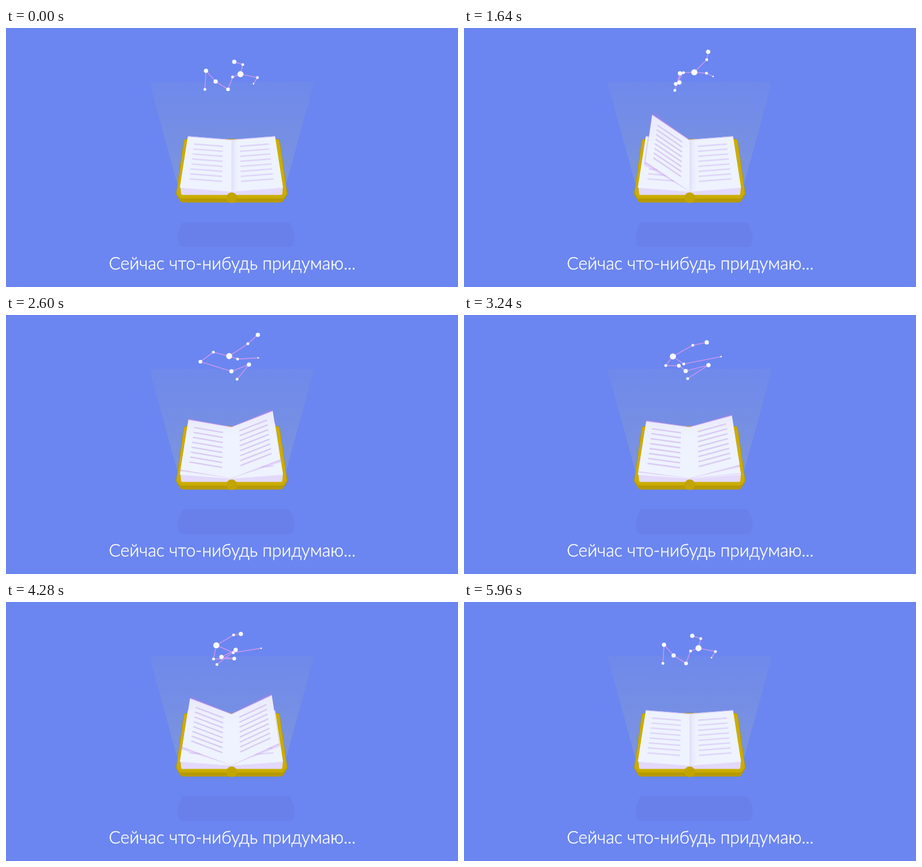
Recreate the animation shown at these times as an HTML page with a canvas. Size 800x460 px, loop 6 s.

```html
<!DOCTYPE html>
<html lang="ru">
<head>
<meta charset="utf-8">
<title>Книга</title>
<style>
html, body { margin: 0; width: 100%; height: 100%; overflow: hidden; background: #6b86f0; }
canvas { display: block; }
</style>
</head>
<body>
<canvas id="stage" width="800" height="460"></canvas>
<script>
const ctx = document.getElementById('stage').getContext('2d');
const LOOP = 6000, STEP = 40;
const MID = 399;
const BODY = 6;       // stars in the body; the rest form two arms
const PAPER = '#eef3ff';

// Three poses of the constellation; it drifts home -> drift -> far -> home.
const HOME = [[352, 109], [354, 76], [371, 95], [393, 109], [401, 87], [415, 82],
              [445, 88], [438, 99], [419, 65], [404, 60]];
const DRIFT = [[409, 114], [430, 88], [399, 100], [344, 83], [367, 66], [395, 73],
               [418, 75], [443, 77], [437, 50], [452, 30]];
const FAR = [[385, 112], [435, 90], [387, 99], [410, 96], [349, 109], [349, 74],
             [379, 91], [459, 73], [394, 55], [422, 55]];
const RADII = [2.5, 3.8, 3.8, 3.3, 2.5, 5.4, 2.5, 1.4, 2.5, 3.8];
const LINKS = [[0, 1, 2, 3, 4, 5, 6, 7], [5, 8, 9]];
const BODY_AT = 2600, ARMS_AT = 2100, FAR_AT = 3800, HOME_AT = 5000;

// Page turns, right to left.
const TURN = 900;
const STARTS = [983, 1800, 2420, 3098, 3188, 3368, 3557, 4080];

const mix = (a, b, k) => a + (b - a) * k;
const mixPoint = (p, q, k) => [mix(p[0], q[0], k), mix(p[1], q[1], k)];
const part = (t, from, to) => Math.min(1, Math.max(0, (t - from) / (to - from)));
const smooth = u => u * u * (3 - 2 * u);

function poly(points, fill) {
  ctx.beginPath();
  points.forEach(p => ctx.lineTo(p[0], p[1]));
  ctx.closePath();
  ctx.fillStyle = fill;
  ctx.fill();
}

function softPoly(points, fill, round) {
  ctx.lineJoin = 'round';
  ctx.lineWidth = round * 2;
  ctx.strokeStyle = fill;
  poly(points, fill);
  ctx.stroke();
}

// Mirror a half outline, listed top to bottom, around the spine.
const mirrored = half =>
  half.concat(half.map(([x, y]) => [2 * MID + 1 - x, y]).reverse());

function disc(x, y, r, fill) {
  ctx.beginPath();
  ctx.arc(x, y, r, 0, 7);
  ctx.fillStyle = fill;
  ctx.fill();
}

function gradient(x0, y0, x1, y1, from, to) {
  const g = ctx.createLinearGradient(x0, y0, x1, y1);
  g.addColorStop(0, from);
  g.addColorStop(1, to);
  return g;
}

// Spine top, outer top, outer bottom, spine bottom of a page at angle a.
function pageQuad(a) {
  const c = Math.cos(a), s = Math.sin(a);
  return [[MID, 199], [MID + 76.5 * c, 193 - 77 * s],
          [MID + 90.5 * c, 283 - 90 * s], [MID, 290]];
}

function textLines(q, color) {
  ctx.strokeStyle = color;
  ctx.lineWidth = 2.6;
  ctx.beginPath();
  for (let i = 0; i < 8; i++) {
    const v = 0.135 + i * 0.098;
    const inner = mixPoint(q[0], q[3], v), outer = mixPoint(q[1], q[2], v);
    ctx.moveTo(...mixPoint(inner, outer, 0.19));
    ctx.lineTo(...mixPoint(inner, outer, 0.845));
  }
  ctx.stroke();
}

function topEdge(q, color) {
  ctx.beginPath();
  ctx.moveTo(...q[0]);
  ctx.lineTo(...q[1]);
  ctx.strokeStyle = color;
  ctx.lineWidth = 1.2;
  ctx.stroke();
}

function background() {
  ctx.fillStyle = '#6b86f0';
  ctx.fillRect(0, 0, 800, 460);
  poly(mirrored([[254, 96], [304, 280]]),
    gradient(0, 96, 0, 275, 'rgba(185,200,150,.05)', 'rgba(190,205,150,.2)'));
  softPoly([[317, 352], [498, 352], [504, 368], [502, 382], [313, 382], [311, 368]], '#697fe9', 7);
}

function book() {
  softPoly(mirrored([[320, 203], [307, 294], [313, 304]]), '#b69a02', 6);
  softPoly(mirrored([[320, 203], [307, 293], [311, 298]]), '#cbad00', 4.8);
  softPoly(mirrored([[311, 284], [312, 294.5]]), '#e3d9fb', 2);
  disc(MID + 0.5, 301.5, 9.5, '#c2a500');
  for (const a of [Math.PI, 0]) {
    const q = pageQuad(a);
    softPoly(q, PAPER, 0.8);
    topEdge(q, '#dcc4f8');
    textLines(q, '#dfd5fa');
  }
  poly([[MID, 199], [412, 198], [414, 289], [MID, 290]],
    gradient(MID, 0, 414, 0, '#e2dbfa', 'rgba(238,243,255,0)'));
}

function turningPage(p) {
  const angle = Math.PI / 2 * (1 - Math.cos(Math.PI * p));
  const blur = 0.05 * Math.sin(Math.PI * p);
  for (let j = -2; j <= 2; j++) {
    poly(pageQuad(angle + j * blur), 'rgba(190,120,236,.2)');
  }
  const q = pageQuad(angle);
  const flat = Math.min(1, Math.abs(Math.cos(angle)) / 0.5);
  const tone = [mix(176, 238, flat), mix(140, 241, flat), mix(236, 252, flat)].map(Math.round);
  poly(q, gradient(0, q[1][1], 0, 215,
    `rgba(${tone},${mix(0.35, 0.93, flat)})`, PAPER));
  topEdge(q, '#d2a6f1');
  if (flat > 0.6) textLines(q, '#dacbf5');
}

// Pages nearest to upright are drawn last.
function pages(t) {
  STARTS.map(s => (t - s) / TURN)
    .filter(p => p > 0 && p < 1)
    .sort((a, b) => Math.abs(b - 0.5) - Math.abs(a - 0.5))
    .forEach(turningPage);
}

function starAt(i, t) {
  const arrive = i < BODY ? BODY_AT : ARMS_AT;
  let p = mixPoint(HOME[i], DRIFT[i], part(t, 0, arrive) ** 2.15);
  p = mixPoint(p, FAR[i], smooth(part(t, arrive, FAR_AT)));
  return mixPoint(p, HOME[i], smooth(part(t, FAR_AT, HOME_AT)));
}

function stars(t) {
  const pos = HOME.map((_, i) => starAt(i, t));
  ctx.strokeStyle = '#c895ef';
  ctx.lineWidth = 1.6;
  for (const chain of LINKS) {
    ctx.beginPath();
    chain.forEach(i => ctx.lineTo(...pos[i]));
    ctx.stroke();
  }
  pos.forEach(([x, y], i) => disc(x, y, RADII[i], '#f8faff'));
}

const CAPTION = 'Сейчас что-нибудь придумаю...';
const font = size => `300 ${size}px Lato, "Open Sans", "Noto Sans", sans-serif`;
ctx.font = font(30);
const captionSize = 30 * 437 / ctx.measureText(CAPTION).width;

function caption() {
  ctx.font = font(captionSize);
  ctx.textAlign = 'center';
  ctx.fillStyle = ctx.strokeStyle = '#fff';
  ctx.lineWidth = 0.5;
  ctx.fillText(CAPTION, 400.5, 429);
  ctx.strokeText(CAPTION, 400.5, 429);
}

function draw(now) {
  const t = Math.floor(now % LOOP / STEP) * STEP;
  background();
  book();
  pages(t);
  stars(t);
  caption();
}

const begin = performance.now();
function tick() {
  draw(performance.now() - begin);
  requestAnimationFrame(tick);
}
tick();
</script>
</body>
</html>
```
